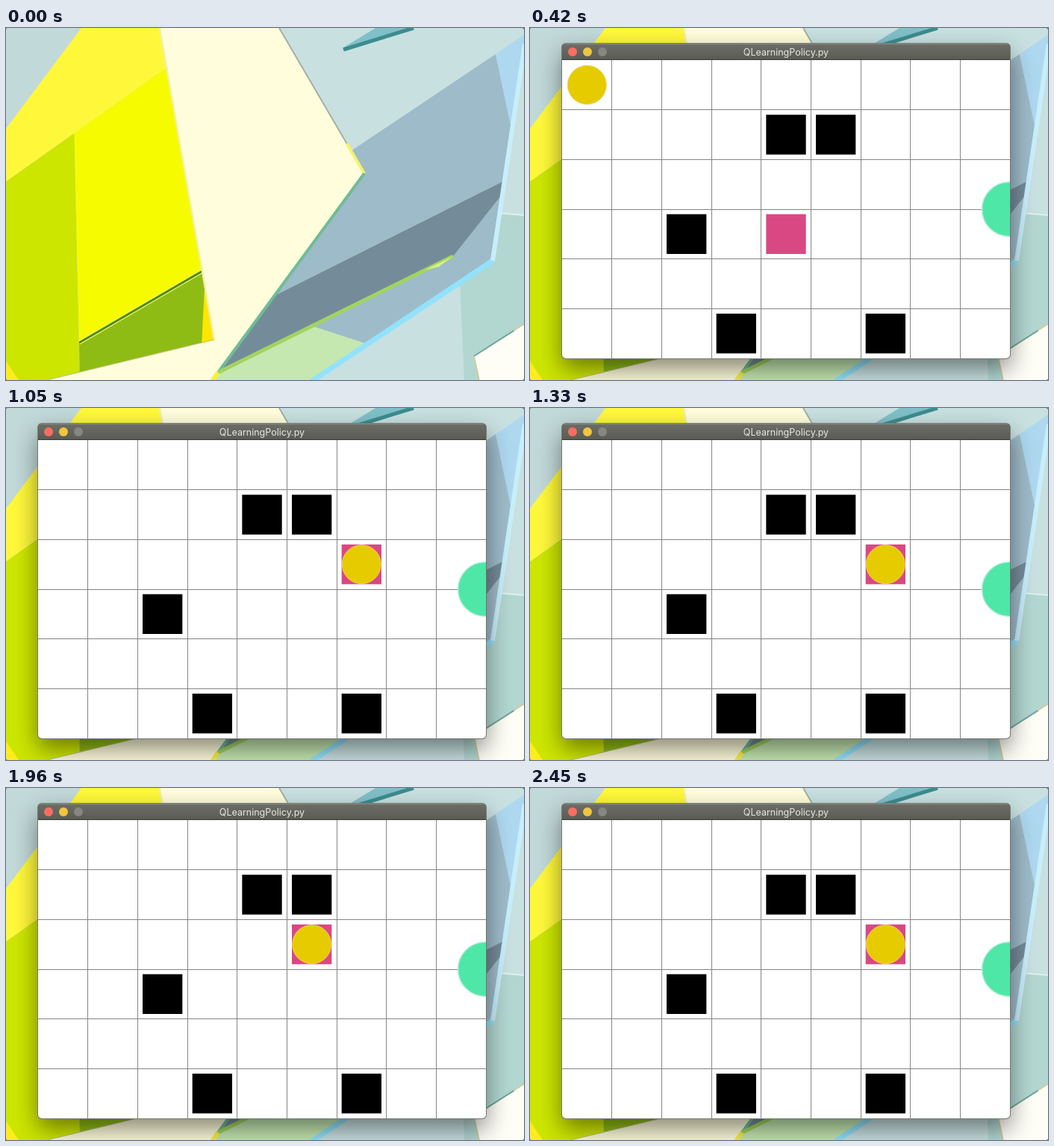
Recreate the animation shown at these times as an HTML page. Size 694x472 px, loop 2520 ms.

```html
<!DOCTYPE html>
<html lang="en">
<head>
<meta charset="utf-8">
<title>QLearningPolicy.py</title>
<style>
html, body { margin: 0; width: 100%; height: 100%; overflow: hidden; background: #555; }
#stage { position: relative; width: 694px; height: 472px; overflow: hidden; border-radius: 3px; }
svg { position: absolute; left: 0; top: 0; display: block; }
#win {
  position: absolute; left: 43px; top: 21px; width: 600px; height: 422px;
  border-radius: 5px; background: #5b5d55;
  box-shadow: 0 0 0 1px #7b8078, 0 6px 26px rgba(0, 0, 0, .3);
}
#win.active { box-shadow: 0 0 0 1px #757a73, 0 14px 32px rgba(0, 0, 0, .48); }
#clip { position: absolute; inset: 0; overflow: hidden; border-radius: 5px; }
#bar {
  position: absolute; left: 0; top: 0; width: 600px; height: 22px; box-sizing: border-box;
  background: #575a51; border-top: 1px solid #888a83; border-bottom: 1px solid #383a35;
  color: #9d9f98; font: 12.5px/21px Inter, Roboto, sans-serif; text-align: center;
}
.active #bar { background: linear-gradient(#6b6d66, #5a5c54); color: #e6e7e3; }
#bar i { position: absolute; top: 4px; width: 12px; height: 12px; border-radius: 50%; background: #777971; }
.active #bar i:nth-of-type(1) { background: #fb6d61; }
.active #bar i:nth-of-type(2) { background: #f0c640; }
.active #bar i:nth-of-type(3) { background: #858780; }
#board { top: 22px; visibility: hidden; }
.active #board { visibility: visible; }
</style>
</head>
<body>
<div id="stage">
  <svg id="wall" width="694" height="472"></svg>
  <div id="win">
    <div id="clip">
      <div id="bar"><i style="left:8px"></i><i style="left:28px"></i><i style="left:48px"></i>QLearningPolicy.py</div>
      <svg id="board" width="600" height="400"></svg>
    </div>
  </div>
</div>
<script>
const W = 694, H = 472;
const $ = id => document.getElementById(id);
const wall = $('wall'), board = $('board'), win = $('win');
const clamp = v => Math.min(1, Math.max(0, v));
const mix = (p, q, t) => p.map((v, i) => v + (q[i] - v) * t);

function add(parent, tag, attrs) {
  const el = document.createElementNS('http://www.w3.org/2000/svg', tag);
  for (const k in attrs) el.setAttribute(k, attrs[k]);
  return parent.appendChild(el);
}
const face = (fill, ...pts) => add(wall, 'polygon', { fill, points: pts.join(' ') });
const edge = (stroke, width, ...pts) =>
  add(wall, 'polyline', { stroke, 'stroke-width': width, points: pts.join(' '), fill: 'none' });

// Wallpaper: a few corners, the rest lie on the lines between them
function drawWall() {
  const topLeft = [0, 0], bottomLeft = [0, H], bottomRight = [W, H];

  // Cream sheet
  const creamL = [206, 0], creamR = [366, 0], tip = [480, 195];
  const foot = [284, 462], heel = [279, 418], toe = [55, H];
  const tipStart = mix(creamR, tip, .795);

  // Yellow and green on the left
  const skyTop = [101, 0], skyLow = [0, 135], limeTop = [0, 206];
  const goldTop = mix(creamL, heel, .127), goldLow = mix(creamL, heel, .78);
  const limePeak = mix(limeTop, goldTop, .425);
  const leafTop = [98, 422], leafLow = mix(toe, heel, .195), leafEnd = mix(toe, heel, .925);

  // Blue panel and its rim
  const rim = [652, 312], rimTop = [695, 22], rimLow = [409, 474];
  const onRim = t => mix(rim, rimTop, t), onBase = t => mix(rim, rimLow, t);
  const panelTop = [656, 35], shadeEnd = [599, 306];
  const shadeTop = mix(tip, foot, .615), mintTop = mix(foot, shadeEnd, .4);

  // Right side
  const tealR = [W, 251], paperR = [W, 397], paperL = [627, 440], paperLow = [634, H];
  const paperMid = mix(paperL, paperR, .8);

  face('#c8e0e0', topLeft, [W, 0], bottomRight, bottomLeft);
  face('#c2d9d9', topLeft, skyTop, skyLow);
  face('#fff83a', skyTop, creamL, goldTop, limeTop, skyLow);
  face('#cde600', limeTop, limePeak, leafLow, toe, bottomLeft);
  face('#f7fb00', limePeak, goldTop, goldLow, leafTop);
  face('#8fbc14', leafTop, goldLow, heel, leafLow);
  face('#ffe600', mix(creamL, heel, .825), heel, leafEnd);
  face('#ffec1e', [0, 447], [17, H], bottomLeft);
  edge('#fbfd7a', 5, leafTop, goldLow);
  edge('#4f8a10', 3, leafTop, goldLow);

  face('#9ebbca', tipStart, [462, 165], panelTop, onRim(.6), rim, onBase(.68), foot, tip);
  face('#aed8f0', panelTop, [W, 9], rimTop, onRim(.6));
  face('#748c99', shadeTop, onRim(.37), onRim(.31), shadeEnd, foot);
  face('#c4e8b0', foot, mintTop, onBase(.69), rimLow, [281, H]);
  face('#b2d6d0', onBase(.18), rim, onRim(.22), tealR, paperR, paperL, paperLow, [614, H]);
  edge('#def1ee', 2, onRim(.22), tealR);
  face('#fefdf6', paperL, paperR, bottomRight, paperLow);
  edge('#6fa498', 2, paperL, paperMid);
  edge('#d8c890', 1.5, paperMid, paperR);
  edge('#d8c890', 1.5, paperL, paperLow);

  face('#fffddb', creamL, creamR, tip, foot, [275, H], toe, heel);
  edge('#f0f0b0', 2.5, creamL, heel);
  edge('#b7bf78', 1, toe, heel);
  edge('#a4b1a4', 2, creamR, tipStart);
  edge('#f8f26a', 4, tipStart, tip);
  edge('#70bc98', 4, tip, foot);
  edge('#a2d45f', 5, foot, shadeEnd);
  face('#d9f384', mix(shadeEnd, foot, .12), shadeEnd, [580, 320]);
  edge('#f8f040', 6, foot, [276, 474]);
  edge('#92e2fb', 7, rimLow, rim);
  edge('#c8eefb', 6, rim, rimTop);
  face('#80c0c8', [451, 27], [495, 0], [546, 0]);
  edge('#3c8c90', 5, [452, 29], [546, 0]);
}
drawWall();

// Board
const CELL = 200 / 3, PAD = CELL / 10, SIZE = CELL - 2 * PAD;
const box = (fill, [c, r] = [0, 0]) =>
  add(board, 'rect', { x: c * CELL + PAD, y: r * CELL + PAD, width: SIZE, height: SIZE, fill });
const move = (el, [c, r]) => el.setAttribute('transform', `translate(${c * CELL} ${r * CELL})`);
const line = d => add(board, 'path', { d, stroke: '#858585' });

add(board, 'rect', { width: 600, height: 400, fill: '#fff' });
for (let c = 1; c < 9; c++) line(`M${Math.floor(c * CELL) + .5} 0V400`);
for (let r = 1; r < 6; r++) line(`M0 ${Math.floor(r * CELL) + .5}H600`);
[[4, 1], [5, 1], [2, 3], [3, 5], [6, 5]].forEach(p => box('#000', p));
add(board, 'circle', { cx: 599, cy: 200, r: 36.5, fill: '#4fe7a7', stroke: '#b9eedb', 'stroke-width': 1.5 });

const goal = box('#da4883');
const agent = add(board, 'circle', {
  cx: CELL / 2, cy: CELL / 2, r: 26, fill: '#e6cb00', stroke: '#eed25a'
});

// Timeline
const STEP = 70, STEPS = 36, OPEN = 4, START = 6;

function draw(n) {
  const open = clamp((n - 1) / (OPEN - 1));
  win.style.opacity = open;
  win.style.transform = open < 1 ? `scale(${.9 + .1 * open})` : 'none';
  win.classList.toggle('active', n > OPEN);

  // Both close in on a spot that flips between two cells
  const spot = [5 + n % 2, 2], t = clamp((n - START) / 4);
  move(agent, mix([0, 0], spot, t).map(Math.round));
  move(goal, mix([4, 3], spot, t).map(Math.round));
}

function tick() {
  draw(Math.floor(performance.now() / STEP) % STEPS);
  requestAnimationFrame(tick);
}
const zero = performance.now();
(function tick() {
  draw(Math.floor(Math.max(0, performance.now() - zero) / STEP) % STEPS);
  requestAnimationFrame(tick);
})();
</script>
</body>
</html>
```
